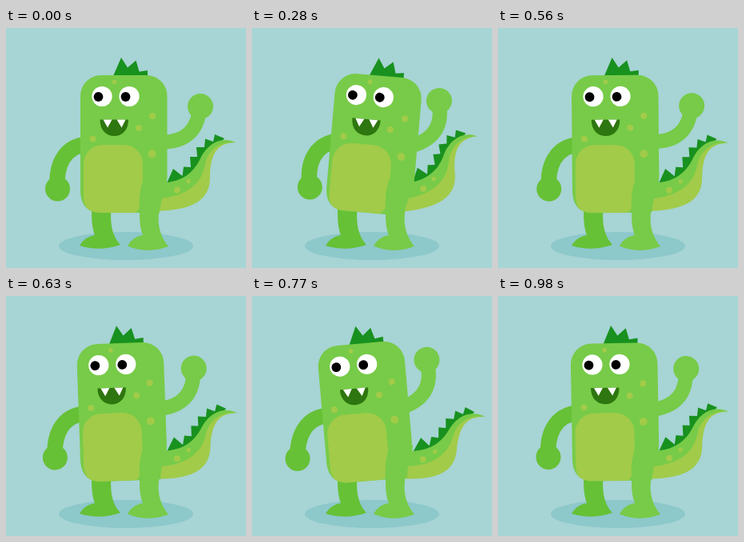
Animation of 300x300 px, one loop 1050 ms. Source, as an HTML page:

```html
<!DOCTYPE html>
<html lang="en">
<head>
<meta charset="utf-8">
<title>Waving dinosaur</title>
<style>
  html, body { margin: 0; width: 100%; height: 100%; overflow: hidden; background: #a7d4d4; }
  svg { display: block; width: 100%; height: 100%; }
  .dark { fill: #18911f; }
  .lime { fill: #a1cb49; }
  .shade { fill: #66c136; }
  .light { fill: #77cb48; }
  .limb { fill: none; stroke-linecap: round; }
</style>
</head>
<body>
<svg viewBox="0 0 300 300">
  <defs>
    <path id="torso" d="M93 85 A26 26 0 0 1 119 59 H175.500 A26 26 0 0 1 201.500 85 V186 C201 204 193 212 192 231 H119 C101 231 93 220 93 203 Z"/>
    <clipPath id="inside"><use href="#torso"/></clipPath>
  </defs>

  <ellipse cx="150" cy="272.500" rx="84" ry="17.500" fill="#8dc8cb"/>

  <g id="tail">
    <path class="dark" d="M201 194 L209 176 L220.500 185 L222 173.500 L231 174 L230 161 L239 161 L238 149 L248 149 L249 138.500 L259 142 L261 133 L273 138 L262 150 L235 186 Z"/>
    <path class="light" d="M180 216 C225 213 246 197 251 172 C255 154 268 143 287 143 C268 134 251 146 243 163 C236 178 224 190 202 193 L180 195 Z"/>
    <path class="lime" d="M180 229 C238 229 256 213 255 184 C256 160 262 143 287 143 C268 141 253 152 249 170 C245 195 225 213 180 214 Z"/>
    <circle class="lime" cx="214" cy="202.500" r="4"/>
    <circle class="lime" cx="228" cy="191.500" r="2.600"/>
  </g>

  <path class="shade" d="M107 222 C107 238 107 248 111 259 C103 260 96 265 92 272 Q117 280 143 271 C134 261 129 247 132 222 Z"/>

  <g id="body">
    <g id="armL">
      <path class="limb" d="M102 145 C71 148 62 174 64.500 201" stroke="#66c136" stroke-width="19.500"/>
      <circle class="shade" cx="64.500" cy="201" r="15.500"/>
    </g>
    <g id="armR">
      <path class="limb" d="M195 142.500 C225 143 240 127 242 100" stroke="#77cb48" stroke-width="18"/>
      <circle class="light" cx="243" cy="98" r="16"/>
    </g>
    <path class="dark" d="M134 60 L144 37 L152 49.500 L162.500 40.500 L166.500 54.500 L177 53 V60 Z"/>
    <use class="light" href="#torso"/>
    <rect class="lime" x="97" y="146" width="74" height="90" rx="24" clip-path="url(#inside)"/>
    <g class="lime">
      <circle cx="135.500" cy="67.500" r="2.800"/>
      <circle cx="183" cy="110" r="4"/>
      <circle cx="166" cy="125" r="4"/>
      <circle cx="108.500" cy="138.500" r="4"/>
      <circle cx="182.500" cy="157.500" r="5"/>
    </g>
    <g fill="#fff">
      <circle cx="120" cy="85.500" r="12.600"/>
      <circle cx="154" cy="85.500" r="12.600"/>
    </g>
    <circle cx="115.500" cy="86" r="5.900"/>
    <circle cx="149.500" cy="86" r="5.900"/>
    <path fill="#2e760f" d="M117.500 114.500 H153 C153 128 145 135 135.300 135 C125.500 135 117.500 128 117.500 114.500 Z"/>
    <path fill="#fff" d="M121.500 114.500 H132.500 L127 124.500 Z M138.500 114.500 H149.500 L144.500 124.500 Z"/>
  </g>

  <path class="light" d="M173 186 C165 205 167 222 167 232 C167 244 168 251 171 259 C163 260 156 265 152 272.500 Q176 283 203 273 C194 262 189 248 191 232 C192 213 200 206 201 186 Z"/>
</svg>
<script>
  const LOOP = 1050, STEP = 70;
  const part = id => document.getElementById(id);
  const linear = p => p;
  const soft = p => (p + (1 - Math.cos(Math.PI * p)) / 2) / 2;

  // Keys are [time in ms, value] pairs
  function track(keys, t, ease) {
    const i = keys.findIndex(k => k[0] > t);
    const [t0, a] = keys[i - 1], [t1, b] = keys[i];
    return a + (b - a) * ease((t - t0) / (t1 - t0));
  }

  const LEAN = [[0, 0], [280, 1], [525, 0], [770, -1], [1050, 0]];
  const WAVE = [[0, 0], [280, -21], [560, 0], [840, -21], [1050, 0]];

  function turn(id, angle, x, y) {
    part(id).setAttribute("transform", `rotate(${angle.toFixed(3)} ${x} ${y})`);
  }

  function draw(now) {
    const t = Math.floor((now % LOOP) / STEP) * STEP;
    const lean = track(LEAN, t, soft);
    turn("body", 5 * lean, 146, 204);
    turn("tail", -5 * lean, 195, 200);
    turn("armL", -8 * lean, 100, 148);
    turn("armR", track(WAVE, t, linear), 195, 143);
  }

  let start;
  function tick(now) {
    start ??= now;
    draw(now - start);
    requestAnimationFrame(tick);
  }
  draw(0);
  requestAnimationFrame(tick);
</script>
</body>
</html>
```
